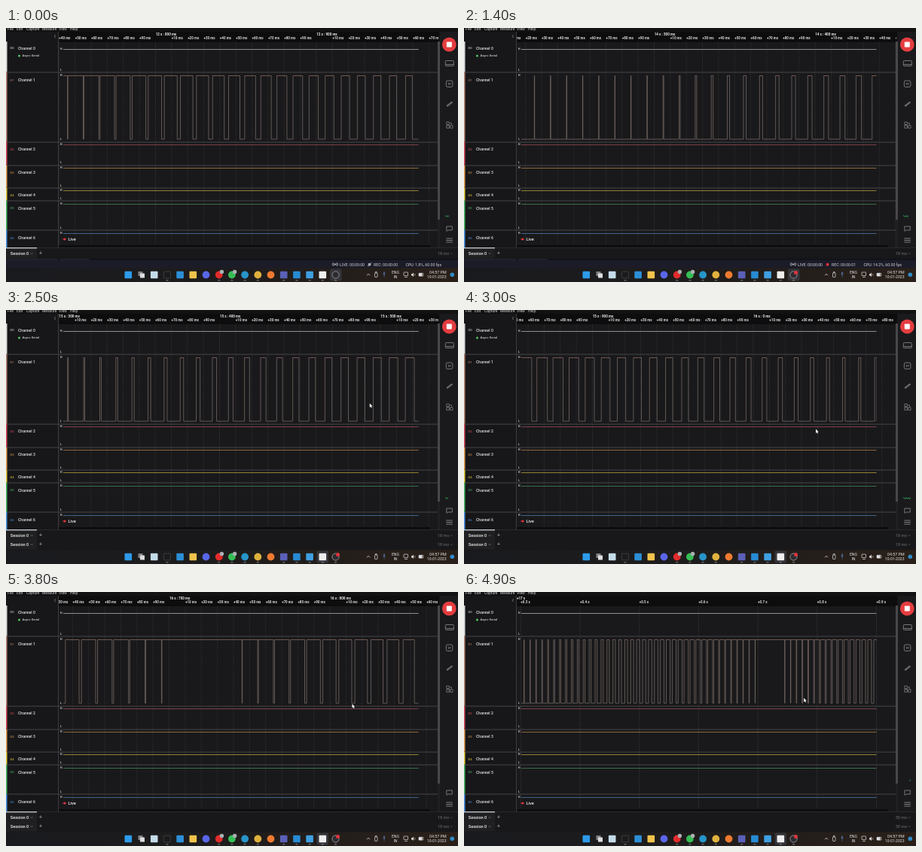
An HTML page with a canvas that plays this animation: 600 px wide and 338 px high, repeating every 5 s.

```html
<!DOCTYPE html>
<html lang="en">
<head>
<meta charset="utf-8">
<title>Logic capture</title>
<style>
html, body { margin: 0; width: 100%; height: 100%; overflow: hidden; background: #18181a; }
canvas { display: block; width: 600px; height: 338px; }
</style>
</head>
<body>
<canvas id="stage"></canvas>
<script>
const W = 600, H = 338, LOOP = 5000, STEP = 100;
const LEFT = 70, RIGHT = 575, TRACE = 76, END = 547.5, PHASE = 5.5;
const canvas = document.getElementById('stage');
const dpr = window.devicePixelRatio || 1;
canvas.width = W * dpr;
canvas.height = H * dpr;
const g = canvas.getContext('2d');
g.scale(dpr, dpr);

// name, bar colour, trace colour, row top, row bottom, name y, high y, low y
const rows = [
  ['0', '#d8dcd8', '#8d8f8d', 18, 59, 27, 28, 56],
  ['1', '#bd8a76', '', 59, 152, 69.7, 63, 148],
  ['2', '#dc4f60', '#7e404a', 152, 183, 161.8, 155, 179],
  ['3', '#eaa253', '#8c653c', 183, 213, 192.8, 186, 210],
  ['4', '#e6d23c', '#928233', 213, 230, 222.8, 216, 227],
  ['5', '#4bbd69', '#386f47', 230, 269, 240.2, 234, 266],
  ['6', '#4a95ea', '#40638c', 269, 292, 279.8, 273, 0]
];

// [time, seconds at the live edge, sweep of the activity mark]
const live = [
  [0, 12.9635, .5], [700, 13.4143, 1.85], [1400, 14.4382, 2.7], [2000, 14.9707, 3.85],
  [3000, 16.0766, 5], [3800, 16.855, 5.98], [4900, 17.9, 7.85]
];
const pointer = [
  [1600, 440, 322], [2000, 498.5, 90], [3000, 467, 158.5], [3800, 459.5, 149], [4900, 451, 141]
];

function at(keys, t) {
  let i = 0;
  while (i < keys.length - 2 && t > keys[i + 1][0]) i++;
  const a = keys[i], b = keys[i + 1];
  const k = Math.min(1, Math.max(0, (t - a[0]) / (b[0] - a[0])));
  return a.slice(1).map((v, j) => v + (b[j + 1] - v) * k);
}

function rect(x, y, w, h, c) { g.fillStyle = c; g.fillRect(x, y, w, h); }

function box(x, y, w, h, r, c, stroke) {
  g.beginPath();
  g.roundRect(x, y, w, h, r);
  paint(c, stroke);
}

function disc(x, y, r, c, stroke) {
  g.beginPath();
  g.arc(x, y, r, 0, Math.PI * 2);
  paint(c, stroke);
}

function paint(c, stroke) {
  if (stroke) { g.strokeStyle = c; g.lineWidth = stroke; g.stroke(); }
  else { g.fillStyle = c; g.fill(); }
}

function line(c, w, ...p) {
  g.beginPath();
  for (let i = 0; i < p.length; i += 2) g.lineTo(p[i], p[i + 1]);
  paint(c, w);
}

function text(s, x, y, size, c, weight = 400, align = 'left') {
  g.font = `${weight} ${size}px Roboto, sans-serif`;
  g.textAlign = align;
  g.textBaseline = 'middle';
  g.fillStyle = c;
  g.fillText(s, x, y);
}

// Share of each 10 ms period spent high; the fade repeats every 100 periods
function duty(n) {
  let m = n % 100;
  if (m < 29) m += 100;
  if (m <= 68) return (m - 28.2) * .0245;
  if (m < 73) return 1;
  return Math.max(.015, .98 - (m - 73) * .0255);
}

function ruler(edge, scale) {
  const far = scale < 1.2, step = far ? 100 : 10;
  const X = ms => END + (ms - edge) * scale;
  const first = Math.floor((edge - (END - LEFT + 30) / scale) / step) * step;
  g.save();
  g.beginPath();
  g.rect(LEFT - 1, 5, RIGHT - LEFT, 287);
  g.clip();
  for (let ms = first; X(ms) < RIGHT; ms += step) {
    const x = X(ms), major = !far && ms % 100 === 0;
    if (x > LEFT) {
      g.setLineDash([1.5, 1.5]);
      line(major || far ? '#3e3e40' : '#363638', .8, x, 19, x, 292);
      g.setLineDash([]);
    }
    const sec = Math.floor(ms / 1000), sub = ms % 1000;
    if (major) text(`${sec} s : ${sub} ms`, x + .3, 8.4, 4.55, '#f0f0f0', 700);
    else if (far) text(`+${sub / 1000} s`, x, 13.5, 4.55, '#dcdcdc', 700);
    else text(`+${ms % 100} ms`, x, 13.5, 4.55, '#dcdcdc', 700);
  }
  if (far) text(`+${Math.floor(edge / 1000)} s`, LEFT, 8.4, 4.55, '#f0f0f0', 700);
  g.restore();
}

function pulses(edge, scale) {
  const hi = 63.5, lo = 148;
  const first = Math.floor((edge - (END - TRACE) / scale) / 10) - 2;
  g.save();
  g.beginPath();
  g.rect(TRACE, 60, END - TRACE, 91);
  g.clip();
  const tops = [];
  g.beginPath();
  for (let n = first; n * 10 + PHASE < edge; n++) {
    const x = END + (n * 10 + PHASE - edge) * scale;
    const d = duty(n), fall = x + d * 10 * scale;
    g.lineTo(x, hi);
    g.lineTo(fall, hi);
    tops.push([x, fall]);
    if (d < 1) {
      g.lineTo(fall, lo);
      g.lineTo(x + 10 * scale, lo);
    }
  }
  paint('#756964', .8);
  g.beginPath();
  for (const [a, b] of tops) { g.moveTo(a, hi); g.lineTo(b, hi); }
  paint('#76554f', .8);
  g.restore();
}

function channels(edge, scale) {
  rect(0, 5, 69, 287, '#171719');
  rect(69, 5, RIGHT - 69, 14, '#0d0d0e');
  rect(69, 19, RIGHT - 69, 273, '#19191b');
  ruler(edge, scale);
  line('#8b8b8b', .7, 66, 9, 64, 11, 66, 13);
  for (const [id, bar, trace, top, bottom, ny, hi, lo] of rows) {
    rect(0, top, 1.5, bottom - top, bar);
    if (bottom < 292) rect(0, bottom - .5, RIGHT, 1, '#464648');
    g.globalAlpha = .8;
    text('D' + id, 5.5, ny, 4.2, bar, 500);
    g.globalAlpha = 1;
    text('Channel ' + id, 16, ny, 5.1, '#dedede', 500);
    text('H', 72, hi + .2, 3.6, '#d0d0d0', 700);
    if (lo) text('L', 72, lo, 3.6, '#c8c8c8', 700);
    if (trace) line(trace, 1, TRACE, hi + .5, END, hi + .5);
  }
  disc(17.5, 37, 1.5, '#53c463');
  text('Async Serial', 21.5, 37, 4.1, '#cfcfcf', 500);
  line('#3c3c3e', 1, 69.5, 5, 69.5, 292);
  pulses(edge, scale);

  disc(78, 281, 1.6, '#e0353f');
  line('#e0353f', .8, 75, 281, 78, 281);
  text('Live', 82.5, 281, 5.7, '#ededed', 500);
  rect(70, 289, 493, 2.5, '#0b0b0c');
  rect(573, 18, 3, 237, '#48484a');
  rect(573, 255, 3, 37, '#202022');
}

function menu() {
  rect(0, 0, W, 5, '#121213');
  [['File', 2], ['Edit', 14], ['Capture', 27], ['Measure', 48], ['View', 70], ['Help', 85]]
    .forEach(([s, x]) => text(s, x, 1.3, 5, '#cfcfcf'));
}

function tools(sweep) {
  const c = '#8e8e90';
  rect(576, 5, 24, 287, '#1a1a1c');
  disc(588.3, 22, 9.4, '#e43d40');
  box(584.8, 18.5, 7, 7, .8, '#ffffff');
  box(583.3, 43.5, 11, 7, 1, c, .8);
  line(c, .8, 583.3, 48.5, 594.3, 48.5);
  box(584.3, 70, 8.5, 8.5, 2, c, .8);
  text('1F', 588.5, 74.5, 4, c, 700, 'center');
  line(c, 2.2, 585.3, 104, 592.3, 98.5);
  line('#1a1a1c', .6, 585.8, 103.6, 591.8, 98.9);
  box(584.8, 125, 3.5, 3.5, 0, c, .7);
  box(584.8, 129.7, 3.5, 3.5, 0, c, .7);
  box(589.5, 129.7, 3.5, 3.5, 0, c, .7);
  line(c, .7, 589.3, 126.5, 591.3, 126.5, 591.3, 129);

  const s = sweep % 2;
  const a = s < 1 ? 583 : 583 + 10 * (s - 1), b = s < 1 ? 583 + 10 * s : 593;
  g.beginPath();
  for (let x = a; x <= b; x += .5) g.lineTo(x, 250.5 + .8 * Math.sin(x * 2));
  paint('#35b45f', 1);

  line(c, .8, 584.8, 270, 584.8, 264, 592.3, 264, 592.3, 269, 586.8, 269, 584.8, 270.5);
  for (let y = 280; y < 286; y += 2.5) line(c, .9, 584.3, y, 592.8, y);
}

function session(y, label) {
  rect(0, y - 7.5, W, 15, '#18181a');
  rect(0, y - 7.5, 41, 14, '#202022');
  text('Session 0', 5.8, y + .2, 5.6, '#ececec', 500);
  line('#929294', .7, 33, y - .5, 34.2, y + .7, 35.4, y - .5);
  text('+', 46, y, 7, '#a8a8aa', 400, 'center');
  text(label, 588, y + .2, 5.4, '#707072', 400, 'right');
  line('#707072', .7, 590, y - .5, 591.2, y + .7, 592.4, y - .5);
}

function recorder(t) {
  const rec = t >= 300, c = '#d4d4da';
  rect(0, 307, W, 13, '#1b1c28');
  rect(0, 307, W, 2, '#11121a');
  rect(0, 307.5, 69, 1, '#30313c');
  rect(72, 307.5, 39, 1, '#30313c');
  disc(437, 314.5, .9, c);
  for (const r of [2, 3.5]) for (const q of [0, Math.PI]) {
    g.beginPath();
    g.arc(437, 314.5, r, q - .8, q + .8);
    paint(c, .7);
  }
  text('LIVE: 00:00:00', 443, 315, 5.2, c);
  const on = rec ? '#e2343d' : '#aaaab2';
  disc(482.5, 314.7, 2, on);
  if (t < 1200) line(on, .8, 480, 317, 485.5, 312.3);
  text('REC: 00:00:0' + (t >= 1200 ? 1 : 0), 488, 315, 5.2, c);
  text(`CPU: ${t >= 1200 ? '14.2' : '1.8'}%, 60.00 fps`, 530.5, 315, 5.2, c);
}

function taskbar(t, swapped) {
  const shade = g.createLinearGradient(0, 0, W, 0);
  shade.addColorStop(0, '#191a1e');
  shade.addColorStop(.5, '#1e1c1c');
  shade.addColorStop(1, '#2a2019');
  rect(0, 319.5, W, 19, shade);
  box(swapped ? 412.5 : 430, 320.5, 15.5, 16, 2, '#34343a');

  const icons = ['#2d9bea', '', '#c4dbe9', '#1b1b1d', '#2c8fd6', '#f1c34c', '#5966e8', '#e22b2b',
    '#36bd55', '#2795c9', '#dfb23d', '#ee7a30', '#5b60b8', '#278bd3', '#3f9fe0', '#eeeeee', '#2c2c30'];
  const round = [6, 7, 8, 9, 10, 11, 16], open = [3, 7, 8, 9, 10, 12, 13, 14, 15, 16];
  icons.forEach((c, i) => {
    const x = 162.3 + i * 17.2;
    if (i === 1) {
      box(x - 4, 324, 6, 6, .5, '#818185');
      box(x - 1.5, 326.5, 6, 6, .5, '#dedee0');
    } else if (round.includes(i)) disc(x, 328.5, 4.9, c);
    else box(x - 4.8, 323.8, 9.6, 9.4, 1, c);
    if (i === 16) disc(x, 328.5, 4.6, '#b8b8bc', .7);
    if (i === 3) box(x - 4.5, 324.2, 9, 8.6, 1, '#555558', .6);
    if (i === 7 || i === 8) disc(x + 3.7, 324.5, 2.7, '#aab0b3');
    if (open.includes(i)) rect(x - 1.5, 335.4, 3, .9, '#929296');
  });
  if (t >= 300) disc(440.5, 325.5, 2.5, '#df3440');

  const c = '#e0e0e2';
  line(c, .8, 479, 329.3, 481, 327.2, 483, 329.3);
  box(489.5, 326, 3.5, 5.5, .6, c, .7);
  line(c, .7, 490.4, 326, 490.4, 324.5, 492.1, 324.5, 492.1, 326);
  box(500.8, 324.5, 2.4, 4.7, 1.2, '#4b5f87');
  line('#4b5f87', .7, 502, 329.5, 502, 332);
  text('ENG', 517, 325.4, 5.2, c, 400, 'center');
  text('IN', 517, 331.3, 5.2, c, 400, 'center');
  box(528, 325, 5.5, 4.5, .5, c, .7);
  line(c, .7, 529, 331.5, 533, 331.5);
  g.beginPath();
  [[538, 327.3], [539.5, 327.3], [541, 325.5], [541, 331], [539.5, 329.5], [538, 329.5]]
    .forEach(p => g.lineTo(...p));
  paint(c);
  line(c, .6, 542.3, 326.8, 543, 328.3, 542.3, 329.8);
  box(548, 326.3, 5.8, 3.8, .7, c, .7);
  rect(548, 326.3, 4.5, 3.8, c);
  text('04:57 PM', 584.5, 325.3, 5.3, c, 400, 'right');
  text('10-01-2023', 584.5, 331.4, 5.1, c, 400, 'right');
  disc(592.3, 328.3, 2.8, '#3089c6');
}

function arrow(x, y) {
  g.beginPath();
  [[0, 0], [0, 5.2], [1.2, 4.2], [2.1, 6], [3, 5.6], [2.2, 3.8], [3.7, 3.7]]
    .forEach(([a, b]) => g.lineTo(x + a, y + b));
  g.closePath();
  paint('#202020', .8);
  paint('#ffffff');
}

function draw(t) {
  const [edge, sweep] = at(live, t);
  const zoom = Math.min(1, Math.max(0, (t - 4400) / 300));
  const scale = 2.135 * Math.pow(.787 / 2.135, zoom);
  const span = Math.round(18 + 32 * zoom) + ' ms';
  const swapped = t >= 1600;

  rect(0, 0, W, H, '#18181a');
  menu();
  channels(edge * 1000, scale);
  tools(sweep);
  session(300, span);
  rect(0, 292, W, 1, '#29292b');
  rect(0, 292, 41, 1.4, '#bfc3c8');
  if (swapped) session(312, span);
  else recorder(t);
  taskbar(t, swapped);
  if (swapped) arrow(...at(pointer, t));
}

const start = performance.now();
function tick() {
  const t = (performance.now() - start) % LOOP;
  draw(Math.floor(t / STEP) * STEP);
  requestAnimationFrame(tick);
}
tick();
</script>
</body>
</html>
```
